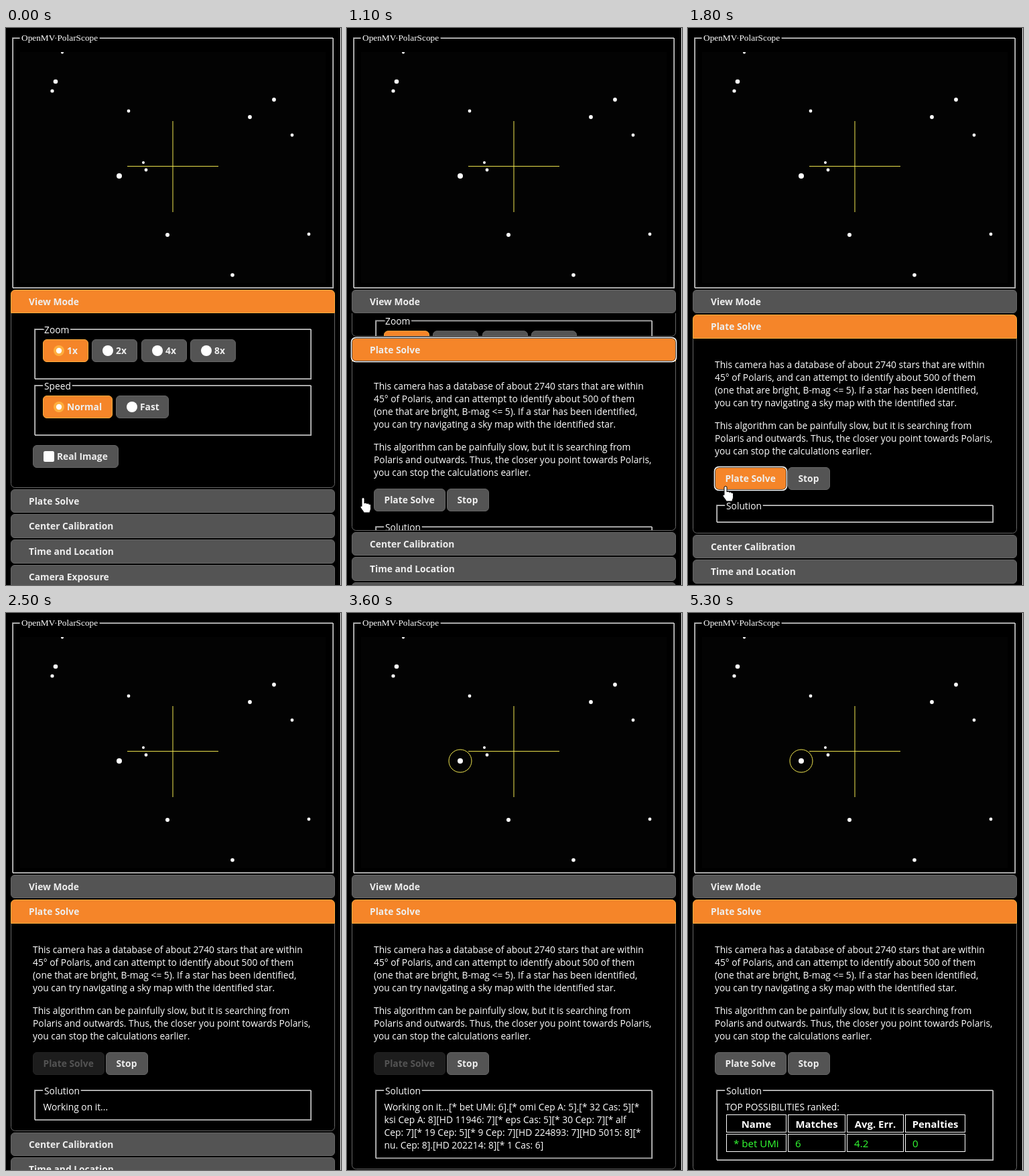
Write an HTML page that moves like this. It is 500 px wide and 832 px high and loops after 7300 ms.

```html
<!DOCTYPE html>
<html lang="en">
<head>
<meta charset="utf-8">
<title>PolarScope</title>
<style>
  html, body { margin: 0; height: 100%; overflow: hidden; background: #000; }
  svg { display: block; }
  text { font: 13.8px "Open Sans", "Noto Sans", sans-serif; fill: #fff; white-space: pre; }
  .bold { font-weight: 700; fill: #eee; }
  .legend { stroke: #000; stroke-width: 6px; stroke-linejoin: round; paint-order: stroke; }
  .title { font: 13.33px "Liberation Serif", serif; }
  .cell { font-size: 15.1px; fill: #3f3; }
  .head { font-size: 14.9px; font-weight: 700; text-anchor: middle; }
</style>
</head>
<body>
<svg id="stage" width="500" height="832"></svg>
<script>
const LOOP = 7300, STEP = 100;
const HEADER = 35.6, PITCH = 37.6, TOP = 390.7, LINE = 19.07, PAD = 14.67;
const VIEW_H = 260.4, SOLVE_H = 290.8;
const OPEN_START = 900, OPEN_MS = 262;
const PRESS = 1800, DISABLE = 2000, CIRCLE = 2800, DONE = 5300;

const SKINS = {
  normal: ['#545454', '#666'],
  hover: ['#0a78a3', '#59b4d4'],
  active: ['#f58529', '#ffaf3f'],
};

const STARS = [[84, 36.5, 2], [74, 80, 3.3], [69, 94, 2.6], [183, 124, 2.4], [205, 201, 2],
  [209, 212, 2.4], [169, 221, 4], [241, 309, 3], [400, 107, 2.9], [364, 133, 2.9],
  [427, 160, 2.4], [452, 308, 2.4], [338, 369, 2.8]];

const INTRO = [
  'This camera has a database of about 2740 stars that are within',
  '45° of Polaris, and can attempt to identify about 500 of them',
  '(one that are bright, B-mag &lt;= 5). If a star has been identified,',
  'you can try navigating a sky map with the identified star.'];
const ADVICE = [
  'This algorithm can be painfully slow, but it is searching from',
  'Polaris and outwards. Thus, the closer you point towards Polaris,',
  'you can stop the calculations earlier.'];

const LOG = `[* bet UMi: 6].[* omi Cep A: 5].[* 32 Cas: 5][*
ksi Cep A: 8][HD 11946: 7][* eps Cas: 5][* 30 Cep: 7][* alf
Cep: 7][* 19 Cep: 5][* 9 Cep: 7][HD 224893: 7][HD 5015: 8][*
nu. Cep: 8].[HD 202214: 8][* 1 Cas: 6][* lam Cep: 6][* bet
Cas: 5][HD 21389: 7][HD 6676: 7][* zet Cep: 8][* 14 Cep: 7][*
eta Cas: 6].[* mu. Cas: 7][* g Per: 7][HD 3240: 6][* 1 Cam: 6]`.match(/\[[^\]]*\]|\./g);

// [time, number of log entries shown]
const LOG_STEPS = [[2500, 0], [2700, 1], [2900, 2], [3100, 4], [3200, 5], [3300, 7], [3400, 10],
  [3500, 14], [3600, 18], [3700, 22], [3800, 26], [4000, 28], [4100, 30]];
// [time, x, y] of the fingertip
const POINTER = [[600, 60, 812], [700, 42, 766], [800, 28, 716], [900, 24, 702],
  [1500, 40, 694], [1600, 56, 685], [2100, 80, 740], [2200]];

const latest = (steps, t) => steps.filter(s => s[0] <= t).pop();

const text = (x, y, str, cls = '') => `<text x="${x}" y="${y}" class="${cls}">${str}</text>`;
const lines = (x, y, list) => list.map((s, i) => text(x, Math.round(y + i * LINE), s)).join('');
const rect = (x, y, w, h, r, fill, stroke = 'none', width = 1) =>
  `<rect x="${x}" y="${y}" width="${w}" height="${h}" rx="${r}" fill="${fill}" stroke="${stroke}" stroke-width="${width}"/>`;
const circle = (x, y, r, fill, stroke = 'none') =>
  `<circle cx="${x}" cy="${y}" r="${r}" fill="${fill}" stroke="${stroke}"/>`;

const ring = (x, y, w, h) => rect(x + .5, y + .5, w - 1, h - 1, 5.5, 'none', '#111')
  + rect(x - .5, y - .5, w + 1, h + 1, 6.5, 'none', '#fff', 1.5);

function fieldset(x, y, w, h, label, cls = '') {
  return rect(x + .5, y + .5, w - 2, h - 2, 0, 'none', '#8a8a8a')
    + rect(x + 1.5, y + 1.5, w - 2, h - 2, 0, 'none', '#c8c8c8')
    + text(x + (cls ? 14 : 15), y + (cls ? 5 : 7), label, 'legend ' + cls);
}

function button(x, y, w, label, skin = 'normal', indent = 15.5) {
  const [fill, border] = SKINS[skin];
  return rect(x + .5, y + .5, w - 1, 33, 5.5, fill, border) + text(x + indent, y + 22, label, 'bold');
}

function radio(x, y, w, label, on) {
  return button(x, y, w, label, on ? 'active' : 'normal', 36)
    + (on ? circle(x + 24, y + 17, 8, '#ffaf3f') : '')
    + circle(x + 24, y + 17, on ? 4.2 : 8, '#fff');
}

// Headers and panels snap to whole pixels.
function header(top, label, skin, focused) {
  const [fill, border] = SKINS[skin];
  const y = Math.round(top), h = Math.round(top + HEADER) - y - 1;
  const shape = skin === 'active'
    ? `<path d="M7.5 ${y + .5 + h}v${6 - h}a6 6 0 0 1 6-6h471a6 6 0 0 1 6 6v${h - 6}z" fill="${fill}" stroke="${border}"/>`
    : rect(7.5, y + .5, 483, h, 5.5, fill, border);
  return shape + (focused ? ring(7, y, 484, h + 1) : '') + text(34, y + 23, label, 'bold');
}

// Content is laid out for a panel whose top rests at `rest`; `lift` is the padding lost while sliding.
function panel(top, height, rest, lift, content) {
  const y = Math.round(top), h = Math.round(top + height) - y;
  if (h < 1) return '';
  return `<svg x="7" y="${y}" width="484" height="${h}"><g transform="translate(-7 ${-Math.round(rest) - lift})">${content}</g></svg>`
    + `<path d="M7.5 ${y}v${h - 6.5}a6 6 0 0 0 6 6h471a6 6 0 0 0 6-6v${6.5 - h}" fill="none" stroke="#666"/>`;
}

function sky(t) {
  return rect(21, 36, 456, 345, 0, '#030303')
    + fieldset(9, 14, 480, 375, 'OpenMV PolarScope', 'title')
    + `<svg y="36" width="500" height="345" viewBox="0 36 500 345">${STARS.map(s => circle(...s, '#fff')).join('')}</svg>`
    + '<path d="M181 206.6h136M249 139v136" stroke="#f2e850"/>'
    + (t >= CIRCLE ? circle(169, 221, 17, 'none', '#f2e850') : '');
}

const viewContent = fieldset(42, 449, 414, 76, 'Zoom')
  + ['1x', '2x', '4x', '8x'].map((z, i) => radio(Math.round(55 + i * 73.4), 465, 68, z, !i)).join('')
  + fieldset(42, 533, 414, 76, 'Speed')
  + radio(55, 549, 104, 'Normal', true) + radio(164, 549, 79, 'Fast')
  + button(40, 623, 128, 'Real Image', 'normal', 36) + rect(56, 632, 16, 16, 2.5, '#fff');

function table() {
  const columns = [[57, 90, 'Name', '* bet UMi', 68], [149, 86, 'Matches', 6, 160],
    [237, 85, 'Avg. Err.', 4.2, 248], [324, 90, 'Penalties', 0, 335]];
  return text(55.5, 743, 'TOP POSSIBILITIES ranked:') + columns.map(([x, w, name, value, tx]) =>
    rect(x + .5, 749.5, w - 1, 26, 0, 'none', '#fff') + text(x + w / 2, 769, name, 'head')
    + rect(x + .5, 778.5, w - 1, 26, 0, 'none', '#fff') + text(tx, 798, value, 'cell')).join('');
}

function solveButton(t) {
  if (t >= DISABLE && t < DONE) return `<g opacity=".35">${button(40, 656, 107, 'Plate Solve')}</g>`;
  const pressed = t >= PRESS && t < DISABLE;
  const skin = t >= DONE || t < 1600 ? 'normal' : t === PRESS ? 'active' : 'hover';
  return button(40, 656, 107, 'Plate Solve', skin) + (pressed ? ring(40, 656, 107, 34) : '');
}

// Contents of the solution box and the height they add.
function solution(t) {
  if (t < DISABLE) return ['', 0];
  if (t >= DONE) return [table(), 79];
  const step = latest(LOG_STEPS, t);
  const log = step ? ('Working on it...' + LOG.slice(0, step[1]).join('')).split('\n') : [''];
  return [lines(55.5, 743, log), log.length * LINE];
}

function pointer(at) {
  if (!at || at.length < 3) return '';
  return `<path transform="translate(${at[1]} ${at[2]})" fill="#fff" stroke="#000" d="M-2 1.5a2 2 0 0 1 4 0v6.5
    c1-1.3 3.4-1 3.6.6 1-1 3-.6 3.3.9 1.2-.7 2.6 0 2.6 1.6v4.4c0 3-1.5 4-1.5 6.5h-9
    c0-2-2.5-3.5-4.6-7.5-1-2 .6-3 1.6-1.9z"/>`;
}

function scene(t) {
  const p = Math.min(1, Math.max(0, (t - OPEN_START) / OPEN_MS));
  const open = .5 - .5 * Math.cos(Math.PI * p);
  const at = latest(POINTER, t);
  const [result, extra] = solution(t);
  const viewH = VIEW_H * (1 - open), solveH = (SOLVE_H + extra) * open;
  const solveY = TOP + PITCH + viewH;
  const skinAt = y => t < 1000 && at && at[2] >= y && at[2] < y + HEADER ? 'hover' : 'normal';

  const solveContent = lines(40, 508, INTRO) + lines(40, 599, ADVICE)
    + solveButton(t) + button(149, 656, 63, 'Stop')
    + fieldset(42, 712, 414, 27 + extra, 'Solution') + result;

  let out = sky(t)
    + header(TOP, 'View Mode', p > 0 ? 'normal' : 'active')
    + panel(TOP + HEADER, viewH, TOP + HEADER, PAD * open, viewContent)
    + panel(solveY + HEADER, solveH, TOP + PITCH + HEADER, PAD * (1 - open), solveContent)
    + header(solveY, 'Plate Solve', p > 0 ? 'active' : skinAt(solveY), t >= 900 && t < PRESS);
  ['Center Calibration', 'Time and Location', 'Camera Exposure'].forEach((label, i) => {
    const y = solveY + solveH + PITCH * (i + 1);
    out += header(y, label, skinAt(y));
  });
  return out + rect(499, 0, 1, 832, 0, '#fff') + pointer(at);
}

const stage = document.getElementById('stage');
let shown = -1;
function tick(now) {
  const t = Math.floor(now % LOOP / STEP) * STEP;
  if (t !== shown) stage.innerHTML = scene(shown = t);
  requestAnimationFrame(tick);
}
tick(performance.now());
</script>
</body>
</html>
```
